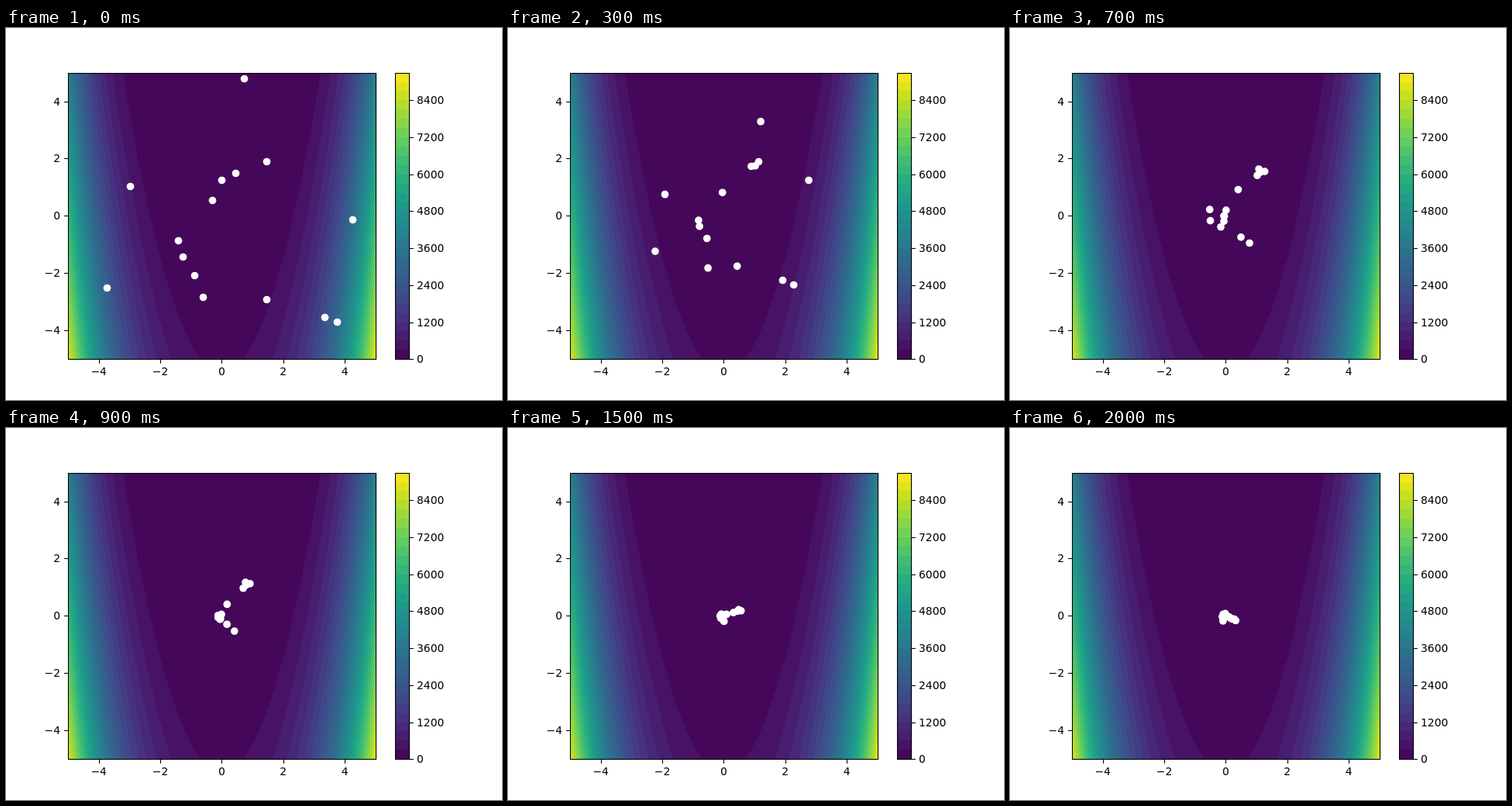
Recreate the animation shown at these times as an HTML page. Size 640x480 px, loop 2.1 s.

```html
<!DOCTYPE html>
<html lang="en">
<head>
<meta charset="utf-8">
<title>Particle swarm on a contour plot</title>
<style>
html, body { margin: 0; width: 100%; height: 100%; overflow: hidden; background: #fff; }
svg { display: block; }
text { font: 13.89px "DejaVu Sans", sans-serif; }
.flat { shape-rendering: crispEdges; }
.line { fill: none; stroke: #000; stroke-width: 1.11; }
</style>
</head>
<body>
<svg id="plot" width="640" height="480" viewBox="0 0 640 480"></svg>
<script>
const plot = document.getElementById("plot");
const LEFT = 80, RIGHT = 476.8, TOP = 57.6, BOTTOM = 427.2;
const BAR = 501.6, BAR_END = 520.08;
const STEP = 300, BANDS = 31;
const px = x => 278.4 + 39.68 * x;
const py = y => 242.4 - 36.96 * y;
const snap = v => Math.round(v) + 0.5;

const viridis = ("440154 481567 482677 453781 404788 39568c 33638d 2d708e 287d8e 238a8d " +
  "1f968b 20a387 29af7f 3cbb75 55c667 73d055 95d840 b8de29 dce319 fde725").split(" ")
  .map(h => [0, 2, 4].map(i => parseInt(h.substr(i, 2), 16)));

function bandColor(band) {
  const t = (band + 0.5) / BANDS * (viridis.length - 1), i = Math.floor(t);
  return `rgb(${viridis[i].map((c, k) => Math.round(c + (viridis[i + 1][k] - c) * (t - i)))})`;
}

// Region where x^2 + 10 (y - x^2)^2 is below the level
function valley(level) {
  const right = [], left = [];
  for (let y = -5; y <= 5.001; y += 0.1) {
    const x = Math.sqrt((20 * y - 1 + Math.sqrt(1 - 40 * y + 40 * level)) / 20);
    right.push([px(x), py(y)]);
    left.unshift([px(-x), py(y)]);
  }
  return right.concat(left).map(p => p.map(v => v.toFixed(2))).join(" ");
}

const rect = (x, y, w, h, attrs = "") =>
  `<rect x="${x}" y="${y}" width="${w}" height="${h}" ${attrs}/>`;
const area = attrs => rect(LEFT, TOP, RIGHT - LEFT, BOTTOM - TOP, attrs);
const frame = (x0, x1) => rect(snap(x0), 58.5, snap(x1) - snap(x0), 369, 'class="line"');
const tick = (x, y, dx, dy) => `<path class="line" d="M${x} ${y}l${dx} ${dy}"/>`;
const label = (x, y, s, anchor) =>
  `<text x="${x}" y="${Math.round(y)}" text-anchor="${anchor}">${String(s).replace("-", "\u2212")}</text>`;

let bands = area(`fill="${bandColor(BANDS - 1)}"`), bar = "", axes = "";
const barStep = (BOTTOM - TOP) / BANDS;
for (let b = BANDS - 1; b >= 0; b--) {
  const fill = `fill="${bandColor(b)}"`;
  if (b < BANDS - 1) bands += `<polygon points="${valley((b + 1) * STEP)}" ${fill}/>`;
  bar += rect(BAR, BOTTOM - (b + 1) * barStep, BAR_END - BAR, barStep, fill);
}
for (let v = -4; v <= 4; v += 2) {
  axes += tick(snap(px(v)), 428, 0, 4.9) + label(px(v), 448, v, "middle");
  axes += tick(80, snap(py(v)), -4.9, 0) + label(70, py(v) + 5, v, "end");
}
for (let v = 0; v <= 8400; v += 1200) {
  const y = BOTTOM - v / STEP * barStep;
  axes += tick(521, snap(y), 4.9, 0) + label(530, y + 5, v, "start");
}

// Each particle flies from its start to a turning point, then is drawn to the minimum
const TURN = 500, SWIRL = 1100, END = 2000;
const MIN_X = 277, MIN_Y = 243;
const swarm = [
  [307, 65, 338, 157], [447, 247, 348, 162], [278, 196, 337, 166],
  [296, 187, 341, 162], [411, 373, 316, 293], [427, 379, 329, 299],
  [336, 172, 307, 181], [160, 204, 230, 221], [130, 335, 229, 256],
  [254, 347, 260, 284], [243, 319, 265, 239], [228, 295, 259, 229],
  [222, 274, 261, 230], [266, 222, 283, 205], [336, 350, 268, 278]
];

function position([x0, y0, x1, y1], t) {
  if (t <= TURN) {
    const f = t / TURN;
    return [x0 + (x1 - x0) * f, y0 + (y1 - y0) * f];
  }
  const dx = x1 - MIN_X, dy = y1 - MIN_Y, start = Math.hypot(dx, dy);
  const pulled = 100 * (1 - Math.exp((TURN - t) / 560));
  const r = Math.max(start - pulled, 0.08 * start);
  const turn = 1.2 * Math.max(0, t - SWIRL) / (END - SWIRL);
  const angle = Math.atan2(dy, dx) + turn;
  return [MIN_X + r * Math.cos(angle), MIN_Y + r * Math.sin(angle)];
}

plot.innerHTML = `<clipPath id="axes">${area()}</clipPath>` +
  `<g class="flat"><g clip-path="url(#axes)">${bands}</g>${bar}</g>` +
  '<g fill="#fff" transform="translate(.5 .5)">' + '<circle r="4.86"/>'.repeat(swarm.length) + "</g>" +
  axes + frame(LEFT, RIGHT) + frame(BAR, BAR_END);
const dots = [...plot.querySelectorAll("circle")];

function draw(now) {
  const t = Math.floor(now % 2100 / 100) * 100;
  dots.forEach((dot, i) => {
    const [x, y] = position(swarm[i], t);
    dot.setAttribute("cx", x);
    dot.setAttribute("cy", y);
  });
  requestAnimationFrame(draw);
}
draw(performance.now());
</script>
</body>
</html>
```
